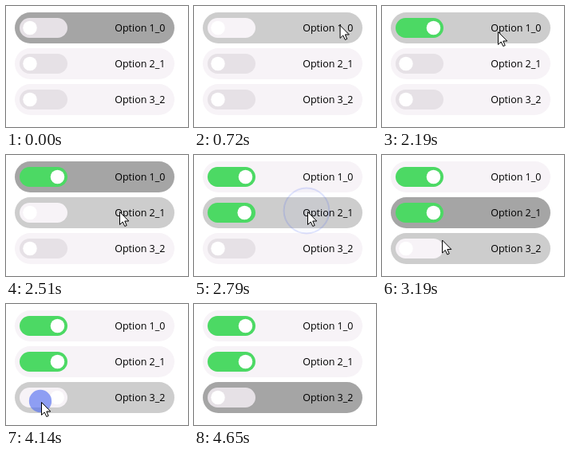
These frames come from a looping animation (228x152 px, 5.3 s). An HTML page:

```html
<!DOCTYPE html>
<html lang="en">
<head>
<meta charset="utf-8">
<style>
html, body { margin: 0; width: 100%; height: 100%; overflow: hidden; background: #fff; }
svg { display: block; }
text { font: 500 12.5px "Open Sans", "Noto Sans", sans-serif; fill: #000; }
</style>
</head>
<body>
<svg width="228" height="152" viewBox="0 0 228 152">
  <g id="rows"></g>
  <circle id="ring" stroke="#4664f0" fill="#4664f0" stroke-width="2"/>
  <path id="cursor" d="M.5 .5V16.5L4.2 13L6.8 18.5L9.2 17.5L6.8 12H11.8Z" fill="#fff" stroke="#000"/>
</svg>
<script>
const LOOP = 5300, SLIDE = 200, RING = 200, ENTER = 540, EXIT = 4650;
const GREEN = '#4cd964', OFF = '#e6e1e6', PALE = '#f7f3f7', HOVER = '#cdcdcd', FOCUS = '#a5a5a5';
const LEFT = 11, TOP = 8, PITCH = 45, WIDTH = 200, HEIGHT = 39;
const $ = id => document.getElementById(id);
const set = (el, attrs) => { for (const k in attrs) el.setAttribute(k, attrs[k]); };
const easeOut = k => 1 - (1 - k) ** 2;
const progress = (t, from, to) => Math.max(0, Math.min(1, (t - from) / (to - from)));

function add(parent, tag, attrs) {
  const el = document.createElementNS('http://www.w3.org/2000/svg', tag);
  set(el, attrs);
  return parent.appendChild(el);
}

const rows = [0, 1, 2].map(i => {
  const g = add($('rows'), 'g', { transform: `translate(${LEFT} ${TOP + PITCH * i})` });
  const bar = add(g, 'rect', { width: WIDTH, height: HEIGHT, rx: HEIGHT / 2 });
  const track = add(g, 'rect', { x: 6, y: 7, width: 60, height: 25, rx: 12.5 });
  const knob = add(g, 'circle', { cy: 19.5, r: 8.75, fill: '#fff' });
  add(g, 'text', { x: 188.5, y: 24, 'text-anchor': 'end' }).textContent = `Option ${i + 1}_${i}`;
  return { bar, track, knob };
});

// the pointer eases from each place to the next
const entry = { x: 217, y: 26 };
const moves = [
  { from: ENTER, to: 1480, x: 118, y: 20 },
  { from: 2040, to: 2190, x: 145, y: 32 },
  { from: 2270, to: 2500, x: 142, y: 71 },
  { from: 2990, to: 3450, x: 44, y: 123 },
  { from: 4400, to: EXIT, x: 49, y: 160 }
];

function pointer(t) {
  return moves.reduce((p, m) => {
    const k = easeOut(progress(t, m.from, m.to));
    return { x: p.x + (m.x - p.x) * k, y: p.y + (m.y - p.y) * k };
  }, entry);
}

function rowAt({ x, y }) {
  const i = Math.floor((y - TOP) / PITCH);
  const inside = x >= LEFT && x < LEFT + WIDTH && y - TOP - i * PITCH < HEIGHT;
  return inside ? i : -1;
}

const clicks = [1790, 2630, 3620, 4140].map(at => ({ at, row: rowAt(pointer(at)) }));

function draw(t) {
  const p = pointer(t);
  const shown = t >= ENTER && t < EXIT;
  const hovered = shown ? rowAt(p) : -1;
  const past = clicks.filter(c => c.at <= t);
  const last = past.at(-1);
  const focused = last ? last.row : 0;

  rows.forEach(({ bar, track, knob }, i) => {
    const hits = past.filter(c => c.row === i);
    const on = hits.length % 2 === 1;
    const hover = i === hovered;
    const k = hits.length ? easeOut(progress(t, hits.at(-1).at, hits.at(-1).at + SLIDE)) : 1;
    set(bar, { fill: hover ? HOVER : i === focused ? FOCUS : PALE });
    set(track, { fill: on ? GREEN : hover ? PALE : OFF });
    set(knob, { cx: 19 + 34.5 * (on ? k : 1 - k) });
  });

  $('cursor').style.display = shown ? '' : 'none';
  set($('cursor'), { transform: `translate(${p.x} ${p.y})` });

  const k = last ? progress(t, last.at, last.at + RING) : 1;
  const grow = easeOut(k);
  $('ring').style.display = k < 1 ? '' : 'none';
  set($('ring'), {
    cx: p.x - 1, cy: p.y - 1, r: 14 + 15 * grow,
    'fill-opacity': 0.6 * (1 - grow), 'stroke-opacity': 0.18 * grow
  });
}

const start = performance.now();
(function tick() {
  draw((performance.now() - start) % LOOP);
  requestAnimationFrame(tick);
})();
</script>
</body>
</html>
```
